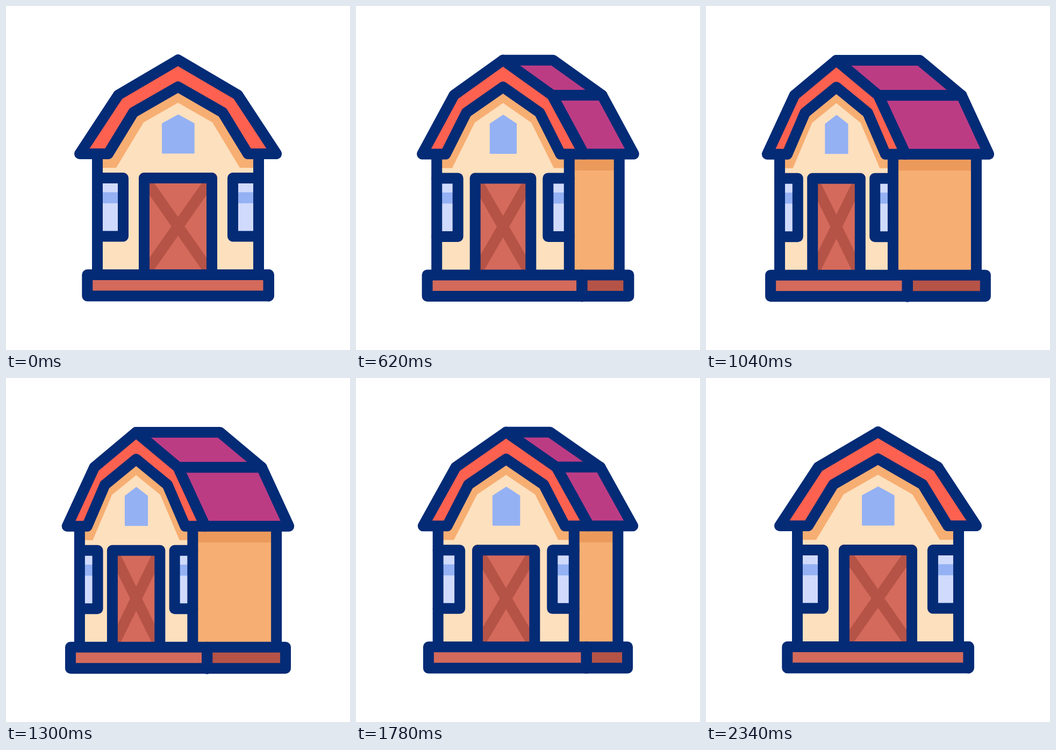
Animation, 640 px wide and 640 px high, one loop 2400 ms. Source, as an HTML page with a canvas:

```html
<!DOCTYPE html>
<html lang="en">
<head>
<meta charset="utf-8">
<title>Turning barn</title>
<style>
html, body { margin: 0; width: 100%; height: 100%; overflow: hidden; background: #fff; }
canvas { display: block; width: 100%; height: 100%; }
</style>
</head>
<body>
<canvas id="stage" width="640" height="640"></canvas>
<script>
const ctx = document.getElementById('stage').getContext('2d');
const LOOP = 2400, HALF = 1191;
const NAVY = '#042b76', RED = '#ff6150', PURPLE = '#bc3c84', CREAM = '#fde0be',
  ORANGE = '#f7ae72', SHADE = '#eb9a5c', BRICK = '#d46a5b', DARK = '#b55347',
  BLUE = '#94b1f4', PALE = '#d0dafc';

// Symmetric cubic bezier (k, 0, 1 - k, 1)
function ease(x, k = 0.78) {
  let lo = 0, hi = 1;
  for (let i = 0; i < 24; i++) {
    const s = (lo + hi) / 2, r = 1 - s;
    if (3 * r * r * s * k + 3 * r * s * s * (1 - k) + s * s * s < x) lo = s; else hi = s;
  }
  return lo * lo * (3 - 2 * lo);
}

function turnAt(t) {
  if (t < HALF) return ease(t / HALF);
  return 1 - ease(Math.min(1, (t - HALF) / HALF));
}

function shape(pts, fill, stroke, width = 20, open = false) {
  ctx.beginPath();
  pts.forEach(([x, y]) => ctx.lineTo(x, y));
  if (!open) ctx.closePath();
  if (fill) { ctx.fillStyle = fill; ctx.fill(); }
  if (stroke) { ctx.strokeStyle = stroke; ctx.lineWidth = width; ctx.stroke(); }
}

const line = (pts, color = NAVY, width = 20) => shape(pts, null, color, width, true);

const box = (x0, y0, x1, y1, fill, stroke) =>
  shape([[x0, y0], [x1, y0], [x1, y1], [x0, y1]], fill, stroke);

// Left half listed bottom to top, last point on the axis
const mirror = half => half.concat(half.slice(0, -1).reverse().map(([x, y]) => [-x, y]));

const OUTER = mirror([[-183, 275], [-111, 165.5], [0, 100.3]]);
const INNER = mirror([[-130, 275], [-83, 198], [0, 150.3]]);
const SHADOW = mirror([[-115, 301], [-64, 216.5], [0, 180]]);
const LOFT = mirror([[-29.3, 273.5], [-29.3, 219], [0, 203]]);

function draw(p) {
  const s = 1 - 0.3 * p, shift = 78.3 * p;
  const fx = x => 320 - shift + x * s;
  const bx = x => 320 + shift + x * s;
  const front = pts => pts.map(([x, y]) => [fx(x), y]);
  const back = pts => pts.map(([x, y]) => [bx(x), y]);

  ctx.setTransform(1, 0, 0, 1, 0, 0);
  ctx.fillStyle = '#fff';
  ctx.fillRect(0, 0, 640, 640);
  ctx.translate(0, 0.7 * p);
  ctx.lineJoin = ctx.lineCap = 'round';

  // Side wall
  const wall = fx(150), far = bx(150);
  box(wall, 275, far, 500, ORANGE);
  box(wall, 275, far, 305.5, SHADE);
  line([[far, 275], [far, 500]]);

  // Front wall with the shadow under the eaves
  const face = front([[-150, 500], [-150, 275], ...INNER, [150, 275], [150, 500]]);
  shape(face, ORANGE);
  ctx.save();
  ctx.clip();
  shape(front([[-150, 500], [-150, 301], ...SHADOW, [150, 301], [150, 500]]), CREAM);
  ctx.restore();
  shape(front(LOFT).map(([x, y]) => [x + 0.4, y]), BLUE, BLUE, 2);

  // Windows
  for (const side of [-1, 1]) {
    const a = fx(150 * side), b = fx(102 * side);
    box(a, 320, b, 428.5, PALE);
    box(a, 346.5, b, 367, BLUE);
    line([[a, 320], [b, 320], [b, 428.5], [a, 428.5]]);
  }

  // Door
  const d0 = fx(-63), d1 = fx(63);
  box(d0, 320, d1, 500, BRICK);
  line([[d0, 320], [d1, 500]], DARK);
  line([[d1, 320], [d0, 500]], DARK);
  line([[d0, 500], [d0, 320], [d1, 320], [d1, 500]]);

  line([[fx(-150), 275], [fx(-150), 500]]);
  line([[wall, 275], [wall, 500]]);

  // Plinth
  const left = 151.3 - 31.5 * p, mid = 488.7 - 115.2 * p, right = 488.7 + 31.5 * p;
  box(mid, 500, right, 539.5, DARK, NAVY);
  box(left, 500, mid, 539.5, BRICK, NAVY);
  line([[mid, 500], [mid, 539.5 + 0.8 * p]]);

  // Roof slopes, then the gable trim
  const near = front(OUTER), rear = back(OUTER);
  for (const i of [2, 3]) {
    shape([near[i], rear[i], rear[i + 1], near[i + 1]], PURPLE, NAVY);
  }
  shape([...near, ...front(INNER).reverse()], RED, NAVY);
}

function tick() {
  draw(turnAt(performance.now() % LOOP));
  requestAnimationFrame(tick);
}
tick();
</script>
</body>
</html>
```
